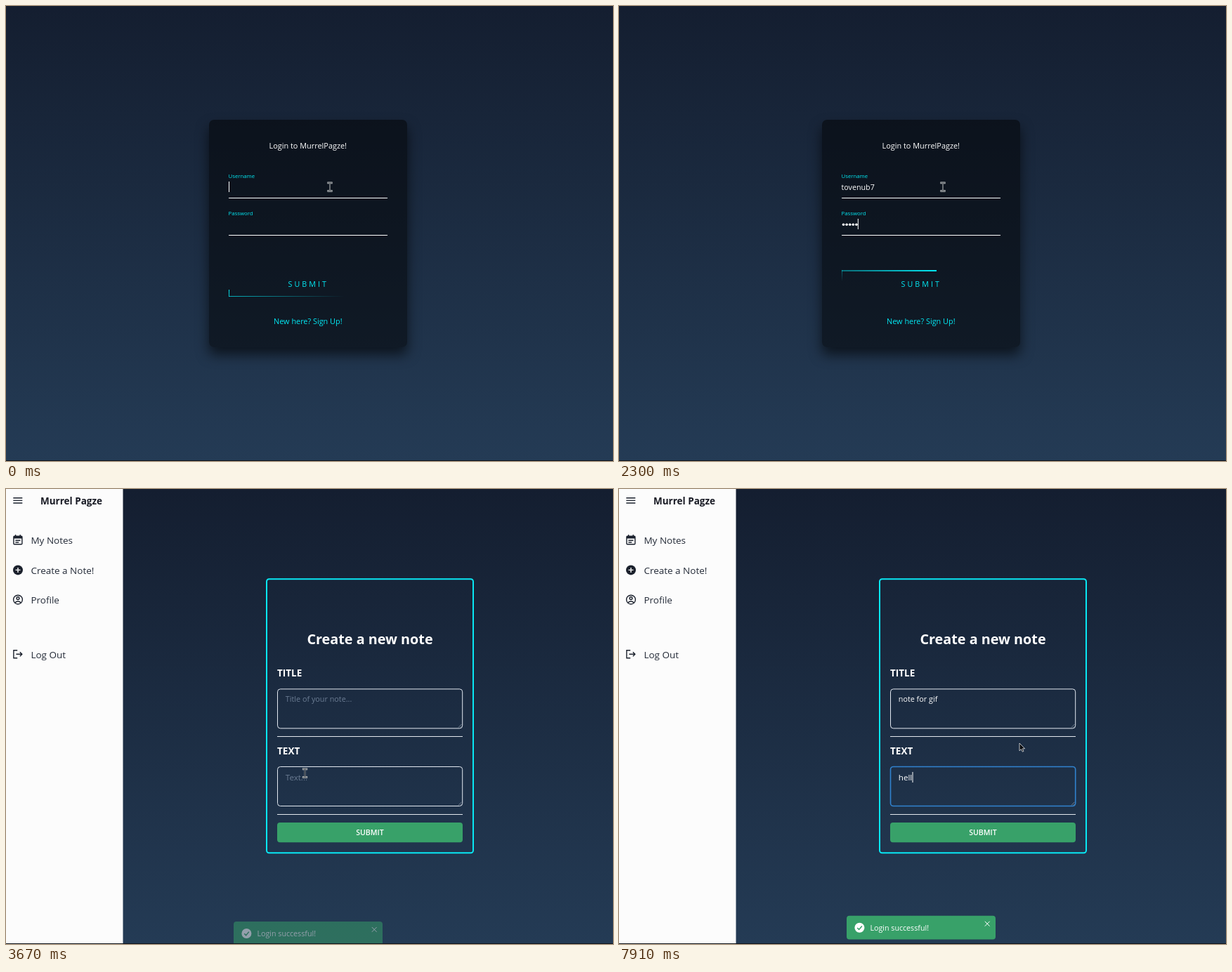
An HTML page that plays this animation: 864x648 px, repeating every 8 s.

```html
<!DOCTYPE html>
<html lang="en">
<head>
<meta charset="utf-8">
<title>Login and new note</title>
<style>
  html, body { margin: 0; width: 100%; height: 100%; overflow: hidden; }
  #stage {
    position: relative; width: 864px; height: 648px; overflow: hidden;
    background: linear-gradient(#141e30, #243b55);
  }
  #login, #art { position: absolute; left: 0; top: 0; }
  #box {
    position: absolute; left: 289px; top: 161.5px; width: 282px; height: 324.5px;
    border-radius: 7px; background: rgba(0, 0, 0, .5);
    box-shadow: 0 10.6px 17.6px rgba(0, 0, 0, .6);
  }
  #btn {
    position: absolute; left: 317px; top: 376.3px; width: 226px; height: 38px; overflow: hidden;
  }
  #btn i { position: absolute; }
  #btn i:nth-child(odd) { width: 100%; height: 1.4px; }
  #btn i:nth-child(even) { width: 1.4px; height: 100%; }
  #btn i:nth-child(1) { top: 0; background: linear-gradient(90deg, transparent, #03e9f4); }
  #btn i:nth-child(2) { right: 0; background: linear-gradient(180deg, transparent, #03e9f4); }
  #btn i:nth-child(3) { bottom: 0; background: linear-gradient(270deg, transparent, #03e9f4); }
  #btn i:nth-child(4) { left: 0; background: linear-gradient(360deg, transparent, #03e9f4); }
  text { font-family: "Open Sans", "Noto Sans", sans-serif; white-space: pre; }
  .cyan { fill: #03e9f4; }
  .white { fill: #fff; }
  .mid { text-anchor: middle; }
  .bold { font-weight: 700; }
  .hint { fill: #6b7c93; }
  .rule { stroke: #e3e8ee; stroke-width: 1; }
</style>
</head>
<body>
<div id="stage">
  <div id="login">
    <div id="box"></div>
    <div id="btn"><i></i><i></i><i></i><i></i></div>
  </div>
  <svg id="art" width="864" height="648" viewBox="0 0 864 648">
    <g id="form">
      <text class="white mid" x="429.8" y="202.5" font-size="10.9">Login to MurrelPagze!</text>
      <text class="cyan" x="316.6" y="244.8" font-size="7.75">Username</text>
      <text class="cyan" x="316.6" y="297.6" font-size="7.75">Password</text>
      <text id="user" class="white" x="316.6" y="262" font-size="10.7"></text>
      <g id="dots" class="white"></g>
      <path d="M317 273.5H543M317 326.5H543" stroke="#fff"/>
      <text id="send" x="401.6" y="399.7" font-size="10.7" letter-spacing="3.05">SUBMIT</text>
      <text class="cyan mid" x="429.8" y="452.5" font-size="10.87">New here? Sign Up!</text>
    </g>

    <g id="app">
      <rect width="166.5" height="648" fill="#fcfcfc"/>
      <text class="bold" x="49" y="21.6" font-size="13.5" fill="#171923">Murrel Pagze</text>
      <g fill="none" stroke="#1a202c" stroke-width="1.4">
        <path d="M10.3 12.8H23.3M10.3 16.4H23.3M10.3 20H23.3"/>
        <rect x="10.9" y="67.2" width="12" height="11.6" rx="1"/>
        <path d="M11 69.2H23" stroke-width="2.6"/>
        <path d="M13.6 65V68M20.2 65V68M13.4 73.2H20.4M13.4 76H18.2"/>
        <circle cx="17" cy="115.4" r="7" fill="#1a202c" stroke="none"/>
        <path d="M13.5 115.4H20.5M17 111.9V118.9" stroke="#fcfcfc"/>
        <circle cx="17" cy="157.6" r="6.4"/>
        <circle cx="17" cy="155.6" r="1.9"/>
        <path d="M12.6 162Q17 157.8 21.4 162"/>
        <path d="M16.2 229.8H10.9V240.8H16.2M14.4 235.3H22.6M19.8 232.3L22.8 235.3L19.8 238.3"/>
      </g>
      <g font-size="13.5" fill="#242b38">
        <text x="35.4" y="78.4">My Notes</text>
        <text x="35.4" y="120.7">Create a Note!</text>
        <text x="35.4" y="163">Profile</text>
        <text x="35.4" y="240.8">Log Out</text>
      </g>

      <rect x="371" y="128.2" width="294" height="390" rx="3.5" fill="none" stroke="#08e8f4" stroke-width="2"/>
      <text class="white bold mid" x="518" y="221" font-size="19.8">Create a new note</text>
      <text class="white bold" x="386" y="267.3" font-size="13.5">TITLE</text>
      <text class="white bold" x="386" y="378.3" font-size="13.5">TEXT</text>
      <g fill="none" stroke="#e2e8f0">
        <rect id="ring0" x="386.5" y="284.9" width="263.2" height="56" rx="4"/>
        <rect id="ring1" x="386.5" y="395.5" width="263.2" height="56" rx="4"/>
      </g>
      <path d="M644 339.5L648.5 335M647 339.5L648.5 338M644 450.3L648.5 445.8M647 450.3L648.5 448.8" stroke="#8d99a8" stroke-width=".8"/>
      <path class="rule" d="M386 352.5H650M386 463.5H650"/>
      <text id="title" x="397.8" y="302.8" font-size="10.8"></text>
      <text id="body" x="397.8" y="415" font-size="11.6"></text>
      <rect x="386" y="475" width="264" height="28.3" rx="4" fill="#38a169"/>
      <text class="white mid" x="518" y="493.4" font-size="10.6" font-weight="600">SUBMIT</text>

      <g id="toast">
        <rect x="324" y="607.8" width="212" height="33.8" rx="4" fill="#38a169"/>
        <circle cx="342.4" cy="624.8" r="7" fill="#fff"/>
        <path d="M339.2 625L341.6 627.4L345.8 622.4" fill="none" stroke="#38a169" stroke-width="1.5"/>
        <text class="white" x="357.4" y="628.7" font-size="10.7">Login successful!</text>
        <path d="M520.8 615.8L527.6 622.6M527.6 615.8L520.8 622.6" stroke="#fff"/>
      </g>
    </g>

    <rect y="647" width="864" height="1" fill="#10151c"/>
    <rect id="caret" width="1" height="15" fill="#fff"/>
    <g id="mouse">
      <g id="beam" fill="none">
        <path d="M-3.6 -5.6H3.6M-3.6 5.8H3.6" stroke="#c4c7c9" stroke-width="2.8"/>
        <path d="M0 -5V5" stroke="#a9adb0" stroke-width="1.8"/>
        <path d="M-3 -5.6H3M-3 5.8H3M0 -5V5" stroke="#1c2229" stroke-width=".8"/>
      </g>
      <path id="arrow" d="M0 0V10.8L2.5 8.5L4.3 12.2L6 11.4L4.3 7.8H7.7Z" fill="#0b0d10" stroke="#e8eaec" stroke-width=".8"/>
      <path id="hand" d="M-1 .8Q0 -.8 1 .8V5L6.3 6.2Q7.8 6.8 7.4 8.6L6.2 13.8H-.4L-4 9Q-4 7.4 -2.4 7.8L-1 9Z" fill="#0b0d10" stroke="#dfe9ea" stroke-width=".7"/>
    </g>
  </svg>
</div>
<script>
const LOOP = 8000;
const $ = id => document.getElementById(id);
const clamp = (v, a = 0, b = 1) => Math.min(b, Math.max(a, v));
const mix = (a, b, k) => a + (b - a) * k;
const show = (el, on) => { el.style.display = on ? '' : 'none'; };
const rgb = (a, b, k) => `rgb(${a.map((v, i) => Math.round(mix(v, b[i], k)))})`;

// CSS-style cubic bezier, solved by bisection
function bezier(x1, y1, x2, y2) {
  const at = (a, b, u) => 3 * a * u * (1 - u) ** 2 + 3 * b * u * u * (1 - u) + u ** 3;
  return x => {
    x = clamp(x);
    let lo = 0, hi = 1;
    for (let i = 0; i < 20; i++) {
      const m = (lo + hi) / 2;
      if (at(x1, x2, m) < x) lo = m; else hi = m;
    }
    return at(y1, y2, lo);
  };
}
const ease = bezier(.25, .1, .25, 1);
const easeInOut = bezier(.4, 0, .2, 1);

// The screen refreshes in steps: [from, step length]
const CLOCK = [[0, 141], [1130, 129], [2420, 138.75], [3530, 132.5], [5120, 132.8]];
function tick(t) {
  const [from, step] = CLOCK.filter(c => t >= c[0]).pop();
  return from + Math.floor((t - from + 8) / step) * step;
}

const CYAN = [3, 233, 244], WHITE = [255, 255, 255];
const PALE = [226, 232, 240], BLUE = [49, 130, 206];
const OPEN = 3655, FOCUS_TITLE = 4920, FOCUS_BODY = 6840;

// Mouse: [time, x, y]
const PATH = [
  [0, 461, 257.5], [2640, 461, 257.5], [3100, 425, 364], [3250, 425, 386],
  [3500, 425.5, 404.5], [3800, 425.5, 404.5], [4200, 440, 345], [4450, 596, 160],
  [4590, 610, 146], [4900, 562, 312], [5100, 570, 362]
];
function mouseAt(s) {
  const i = PATH.findIndex(p => p[0] > s);
  if (i < 0) return PATH[PATH.length - 1].slice(1);
  const a = PATH[i - 1], b = PATH[i];
  const k = (s - a[0]) / (b[0] - a[0]);
  return [mix(a[1], b[1], k), mix(a[2], b[2], k)];
}
function cursorKind(x, y, inApp) {
  const inside = (x0, x1, y0, y1) => x > x0 && x < x1 && y > y0 && y < y1;
  if (inApp) return inside(386, 650, 284, 341) || inside(386, 650, 395, 452) ? 'beam' : 'arrow';
  if (inside(317, 543, 376, 415)) return 'hand';
  return inside(317, 543, 247, 274) || inside(317, 543, 300, 327) ? 'beam' : 'arrow';
}

const count = (s, start, step, max) => clamp(Math.floor((s - start) / step) + 1, 0, max);
const typed = (str, s, start, step) => str.slice(0, count(s, start, step, str.length));

const dots = Array.from({ length: 7 }, (_, i) => {
  const c = document.createElementNS('http://www.w3.org/2000/svg', 'circle');
  c.setAttribute('cx', 319.5 + 4.6 * i);
  c.setAttribute('cy', 311.3);
  c.setAttribute('r', 1.8);
  return $('dots').appendChild(c);
});
const sides = [...$('btn').children];
const edges = ['left', 'top', 'right', 'bottom'];

function field(el, text, hint) {
  el.textContent = text || hint;
  el.setAttribute('class', text ? 'white' : 'hint');
  return text ? el.getComputedTextLength() : 0;
}
function ring(el, k) {
  el.setAttribute('stroke', rgb(PALE, BLUE, k));
  el.setAttribute('stroke-width', 1 + .6 * k);
}
function caret(on, x, y) {
  show($('caret'), on);
  $('caret').setAttribute('x', x);
  $('caret').setAttribute('y', y);
}

function drawLogin(s) {
  $('user').textContent = typed('tovenub7', s, 135, 125);
  const n = count(s, 1520, 165, 7);
  dots.forEach((d, i) => show(d, i < n));
  if (s < 1255) caret(true, 317 + $('user').getComputedTextLength(), 250);
  else caret(s < 3190, n ? 316.8 + 4.6 * n : 317, 303);

  const phase = .817 + s / 1000 * 1.018;
  sides.forEach((el, i) => {
    const u = Math.min(1, (phase - i * .25) % 1 * 2);
    el.style[edges[i]] = -100 + 200 * u + '%';
  });

  const h = ease((s - 3190) / 450);
  const glow = `rgba(${CYAN},${h})`;
  const btn = $('btn').style;
  btn.background = glow;
  btn.borderRadius = 3.5 * h + 'px';
  btn.boxShadow = h ? [3.5, 17.6, 35.3, 70.5].map(r => `0 0 ${r * h}px ${glow}`).join() : 'none';
  $('send').setAttribute('fill', rgb(CYAN, WHITE, h));
}

function drawApp(s) {
  const p = easeInOut((s - 3520) / 400);
  $('toast').setAttribute('opacity', p);
  $('toast').setAttribute('transform', `translate(0 ${17 * (1 - p)})`);

  const leave = ease((s - FOCUS_BODY) / 200);
  ring($('ring0'), ease((s - FOCUS_TITLE) / 200) * (1 - leave));
  ring($('ring1'), leave);

  const w0 = field($('title'), typed('note for gif', s, 5900, 57), 'Title of your note...');
  const w1 = field($('body'), typed('hell', s, 7640, 88), 'Text...');
  if (s < FOCUS_BODY) caret(s >= FOCUS_TITLE && (s < 5500 || s > 5900), 398 + w0, 291);
  else caret(s < 7240 || s > 7640, 398 + w1, 403);
}

function draw(t) {
  const s = tick(t);
  const inApp = s >= OPEN;
  show($('login'), !inApp);
  show($('form'), !inApp);
  show($('app'), inApp);
  (inApp ? drawApp : drawLogin)(s);

  const [x, y] = mouseAt(s);
  const kind = cursorKind(x, y, inApp);
  $('mouse').setAttribute('transform', `translate(${x} ${y})`);
  for (const id of ['beam', 'arrow', 'hand']) show($(id), id === kind);
}

const start = performance.now();
function frame() {
  draw((performance.now() - start) % LOOP);
  requestAnimationFrame(frame);
}
frame();
</script>
</body>
</html>
```
